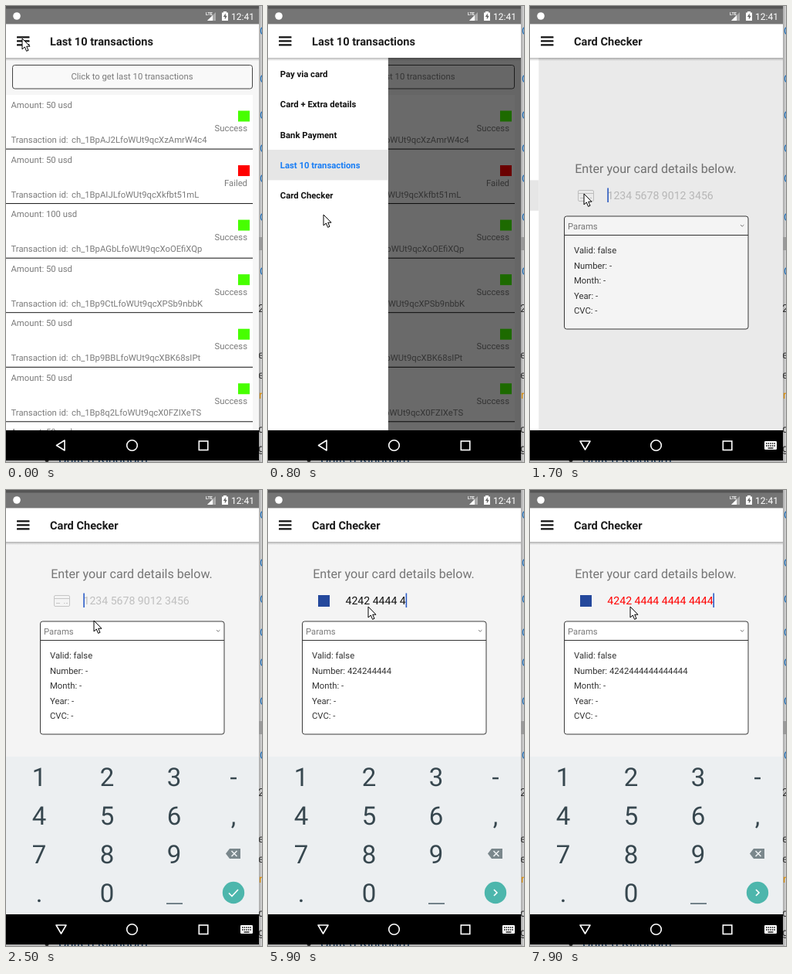
These frames come from a looping animation (332 by 590 pixels, 8000 ms). An HTML page:

```html
<!DOCTYPE html>
<html lang="en">
<head>
<meta charset="utf-8">
<title>Card form demo</title>
<style>
  html, body { margin: 0; width: 100%; height: 100%; overflow: hidden; background: #c4c4c4; }
  svg { display: block; width: 332px; height: 590px; }
  text { font-family: Roboto, sans-serif; font-size: 11.3px; text-rendering: geometricPrecision; white-space: pre; }
  .bold { font-weight: 700; }
  .title { font-size: 14.6px; font-weight: 700; fill: #1b1b1b; }
  .gray { fill: #7b7b7b; }
  .entry { font-size: 14.1px; }
  .key { font-size: 33px; fill: #37474f; text-anchor: middle; }
  .line { fill: none; stroke: #fff; stroke-width: 1.6; }
</style>
</head>
<body>
<svg id="stage" viewBox="0 0 332 590"></svg>
<script>
const LOOP = 8000;
const DRAWER_W = 160;
const DIGITS = '4242444444444444';
const KEY_TIMES = [3400, 3600, 4000, 4300, 5100, 5300, 5500, 5700,
                   5900, 6000, 6200, 6400, 6600, 6800, 7200, 7400];
const CURSOR = [[0, 21, 42], [500, 21, 42], [800, 72, 270], [1200, 70, 243],
                [1700, 70, 243], [2200, 113, 201], [2500, 114, 169],
                [2600, 114, 169], [3000, 130, 151]];
const SHAKE_AT = 7400;
const MENU = ['Pay via card', 'Card + Extra details', 'Bank Payment',
              'Last 10 transactions', 'Card Checker'];
const CHARGES = [
  [50, 'ch_1BpAJ2LfoWUt9qcXzAmrW4c4'],
  [50, 'ch_1BpAIJLfoWUt9qcXkfbt51mL'],
  [100, 'ch_1BpAGbLfoWUt9qcXoOEfiXQp'],
  [50, 'ch_1Bp9CtLfoWUt9qcXPSb9nbbK'],
  [50, 'ch_1Bp9BBLfoWUt9qcXBK68sIPt'],
  [50, 'ch_1Bp8q2LfoWUt9qcX0FZIXeTS'],
  [50, '']
];

const text = (x, y, s, attrs = '') => `<text x="${x}" y="${y}" ${attrs}>${s}</text>`;
const rect = (x, y, w, h, fill, attrs = '') =>
  `<rect x="${x}" y="${y}" width="${w}" height="${h}" fill="${fill}" ${attrs}/>`;
const path = (d, attrs) => `<path d="${d}" ${attrs}/>`;

function charge([amount, id], i) {
  const failed = i === 1;
  return `<g transform="translate(0 ${115 + i * 70.55})">` +
    rect(0, 0, 320, 70, '#fff') +
    text(6.5, 17, `Amount: ${amount} usd`, 'class="gray"') +
    rect(301, 20.5, 15, 14, failed ? '#f00' : '#47ff00') +
    text(313, 47, failed ? 'Failed' : 'Success', 'class="gray" text-anchor="end"') +
    text(6.5, 62, 'Transaction id:', 'class="gray"') +
    text(85, 62, id, 'class="gray"') +
    rect(0, 69.6, 320, 1.5, '#000') + '</g>';
}

const list = () => `<g id="list">` +
  rect(0, 67, 328, 482, '#f6f6f6') +
  rect(8.5, 76.5, 311, 30.5, '#f9f9f9', 'rx="3" stroke="#444"') +
  text(163.5, 95, 'Click to get last 10 transactions', 'class="gray" text-anchor="middle"') +
  CHARGES.map(charge).join('') + '</g>';

const checker = () => `<g id="checker">` +
  rect(0, 67, 328, 482, '#f4f4f4') + '<g id="form">' +
  text(163, 113.5, 'Enter your card details below.',
    'style="font-size:16.1px" fill="#757575" text-anchor="middle"') +
  `<g id="blankCard" fill="none" stroke="#c6c6c6">` +
  rect(62.5, 136.5, 20, 14, 'none', 'rx="1.5"') +
  path('M62.5 140.5H82.5M65 146.5h5M75 146.5h1.5M78 146.5h2', '') + '</g>' +
  rect(65, 136, 15, 15, '#24489c', 'id="brand"') +
  text(100.5, 148.3, '1234 5678 9012 3456', 'id="hint" class="entry" fill="#bfbfbf"') +
  `<g id="entry">` + text(100.5, 148.3, '', 'id="typed" class="entry"') +
  rect(100.5, 133.5, 1.6, 18.5, '#2b5cc8', 'id="caret"') + '</g>' +
  rect(44.5, 170, 238.5, 146, '#fff', 'rx="3" stroke="#3c3c3c"') +
  path('M44.5 194.5H283', 'stroke="#333" stroke-width="1.2"') +
  text(49, 186.6, 'Params', 'class="gray"') +
  path('M273 181.2l2.2 2 2.2-2', 'fill="none" stroke="#777"') +
  ['Valid: false', 'Number: -', 'Month: -', 'Year: -', 'CVC: -'].map((s, i) =>
    text(57, 218 + i * 19.6, s, `fill="#333" ${i === 1 ? 'id="number"' : ''}`)).join('') +
  '</g></g>';

function keyboard() {
  const cols = [43, 131, 218, 295];
  const keys = ['123-', '456,', '789', '.0'].map((row, r) =>
    [...row].map((k, c) => text(cols[c], 382.5 + r * 50, k, 'class="key"')).join('')).join('');
  return `<g id="keyboard">` + rect(0, 345, 328, 204, '#eceff1') + keys +
    rect(208, 534.3, 21, 1.7, '#5f7078') +
    path('M285 470.5l5-6.5h14v13h-14z', 'fill="#7a878c"') +
    path('M292.5 467l7 7m0-7l-7 7', 'stroke="#eceff1" stroke-width="1.6"') +
    `<circle cx="295" cy="521" r="14.2" fill="#4db6ac"/>` +
    path('M289 521.5l4 4 8-8.5', 'id="check" class="line"') +
    path('M293 517l4 4-4 4', 'id="next" class="line"') + '</g>';
}

const drawer = () => rect(0, 67, 328, 482, '#000', 'id="scrim"') +
  `<g id="drawer">` + rect(0, 67, DRAWER_W, 482, '#fff') +
  MENU.map((s, i) => `<g id="item${i}">` +
    rect(0, 67.8 + i * 39.4, DRAWER_W, 39.4, '#e6e6e6') +
    text(20, 91.8 + i * 39.4, s, 'class="bold"') + '</g>').join('') + '</g>';

const header = () => rect(0, 67, 328, 4, 'url(#shade)') +
  rect(0, 0, 328, 4, '#555') + rect(0, 3.5, 328, 20, '#757575') +
  `<circle cx="14" cy="13" r="4.8" fill="#fff"/>` +
  text(259, 11.5, 'LTE', 'fill="#fff" class="bold" style="font-size:5.5px"') +
  path('M261 19L272 8V19Z', 'fill="#aaa"') + path('M261 19L268 12V19Z', 'fill="#fff"') +
  path('M280 8.5h2V7h4v1.5h2V19h-8z', 'fill="#fff"') +
  path('M284.8 9.5l-3 4.5h2v3.5l3-4.7h-2z', 'fill="#666"') +
  text(292, 17.8, '12:41', 'fill="#fff" style="font-size:12px"') +
  rect(0, 23.5, 328, 43.5, '#fff') +
  [39.2, 44.2, 49.2].map(y => rect(14, y, 16.5, 2.4, '#111', 'rx=".6"')).join('') +
  text(57, 51, '', 'id="title" class="title"');

const nav = () => rect(0, 549, 328, 39, '#000') +
  path('M76 562V575L65.5 568.5Z', 'id="back" class="line" stroke-linejoin="round"') +
  path('M65 563H78L71.5 574Z', 'id="hide" class="line" stroke-linejoin="round"') +
  `<circle cx="163.5" cy="568.5" r="6.8" class="line"/>` +
  rect(250.3, 563, 11.5, 11.5, 'none', 'class="line"') +
  `<g id="ime">` + rect(304, 563, 16, 11, '#fff', 'rx="1.2"') +
  path('M306 566h12.5M306 569h12.5', 'stroke="#000" stroke-width="1.4" stroke-dasharray="1.5 1.1"') +
  path('M308.5 572h7', 'stroke="#000" stroke-width="1.3"') + '</g>';

const page = () => rect(0, 0, 332, 590, '#b4b4b4') + rect(328, 0, 4, 590, 'url(#edge)') +
  rect(328, 299, 4, 17, '#9a9a9a') +
  [32, 94, 141, 184, 223, 273, 343].map(y =>
    text(329, y + 5, 'C', 'fill="#1769b5" style="font-size:14px"')).join('') +
  [['2', 396], ['e', 456], ['e', 482], ['c', 552], ['g', 577]].map(([s, y]) =>
    text(327, y, s, 'fill="#333" style="font-size:14px"')).join('') +
  text(328, 508, 'r', 'fill="#d98a00" style="font-size:14px"') +
  `<circle cx="53" cy="587.5" r="2.5" fill="#222"/>` +
  text(68, 592, 'United Kingdom', 'fill="#14304f" style="font-size:16.3px"');

const stage = document.getElementById('stage');
stage.innerHTML = `<defs>
  <linearGradient id="shade" x2="0" y2="1"><stop stop-opacity=".28"/><stop offset="1" stop-opacity="0"/></linearGradient>
  <linearGradient id="edge"><stop stop-color="#a8a8a8"/><stop offset="1" stop-color="#d6d6d6"/></linearGradient>
  <clipPath id="body"><rect y="67" width="328" height="482"/></clipPath>
  </defs>` + page() +
  `<g clip-path="url(#body)">${list()}${checker()}${keyboard()}${drawer()}</g>` +
  header() + nav() +
  path('M0 0V14L3.3 11 5.6 16.4 8 15.3 5.7 10.2H10Z',
    'id="cursor" fill="#fff" stroke="#000" stroke-linejoin="round"');

const el = {};
stage.querySelectorAll('[id]').forEach(n => el[n.id] = n);
const show = (n, on) => n.setAttribute('visibility', on ? 'inherit' : 'hidden');
const move = (n, x, y) => n.setAttribute('transform', `translate(${x.toFixed(2)} ${y.toFixed(2)})`);
const clamp = v => Math.max(0, Math.min(1, v));
const settle = (t, start) => 1 - (1 - clamp((t - start) / 600)) ** 5;

function cursorAt(t) {
  const i = CURSOR.findIndex(k => k[0] > t);
  if (i < 0) return CURSOR[CURSOR.length - 1].slice(1);
  const [t0, x0, y0] = CURSOR[i - 1], [t1, x1, y1] = CURSOR[i];
  const u = (t - t0) / (t1 - t0), e = u * u * (3 - 2 * u);
  return [x0 + (x1 - x0) * e, y0 + (y1 - y0) * e];
}

function draw(t) {
  const onChecker = t >= 1400;
  const selected = onChecker ? 4 : 3;
  show(el.list, !onChecker);
  show(el.checker, onChecker);
  el.title.textContent = MENU[selected];

  // drawer
  const open = settle(t, 490) - settle(t, 1454);
  move(el.drawer, (open - 1) * DRAWER_W, 0);
  show(el.drawer, open > 0.001);
  el.scrim.setAttribute('opacity', (0.6 * open).toFixed(3));
  MENU.forEach((_, i) => {
    const [bg, label] = el['item' + i].children;
    show(bg, i === selected);
    label.setAttribute('fill', i === selected ? '#187df5' : '#111');
  });
  const fade = onChecker ? 0.25 + 0.75 * clamp((t - 1500) / 190) : 1;
  el.item4.setAttribute('opacity', fade.toFixed(3));

  // keyboard
  const up = 1 - (1 - clamp((t - 1800) / 300)) ** 2;
  move(el.keyboard, 0, 204 * (1 - up));
  show(el.keyboard, up > 0);
  move(el.form, 0, t < 1850 ? 102 : 0);
  const ime = t >= 1650;
  show(el.ime, ime);
  show(el.hide, ime);
  show(el.back, !ime);
  const arrow = t >= 5200;
  show(el.check, up > 0 && !arrow);
  show(el.next, arrow);

  // typing
  const n = KEY_TIMES.filter(k => k <= t).length;
  const full = n === DIGITS.length;
  const value = DIGITS.slice(0, n);
  el.typed.textContent = value.replace(/(.{4})(?=.)/g, '$1 ');
  el.typed.setAttribute('fill', full ? '#f00' : '#111');
  el.number.textContent = 'Number: ' + (value || '-');
  show(el.hint, !n);
  show(el.blankCard, n < 4);
  show(el.brand, n >= 4);
  const since = t - (n ? KEY_TIMES[n - 1] : 1500);
  show(el.caret, onChecker && (full || since % 1000 < 500));
  el.caret.setAttribute('x', 100.3 + (n ? el.typed.getComputedTextLength() : 0));
  const shake = clamp((t - SHAKE_AT) / 1000);
  move(el.entry, 3 * Math.sin(shake * 14 * Math.PI), 0);

  move(el.cursor, ...cursorAt(t));
}

function tick() {
  draw(performance.now() % LOOP);
  requestAnimationFrame(tick);
}
tick();
</script>
</body>
</html>
```
